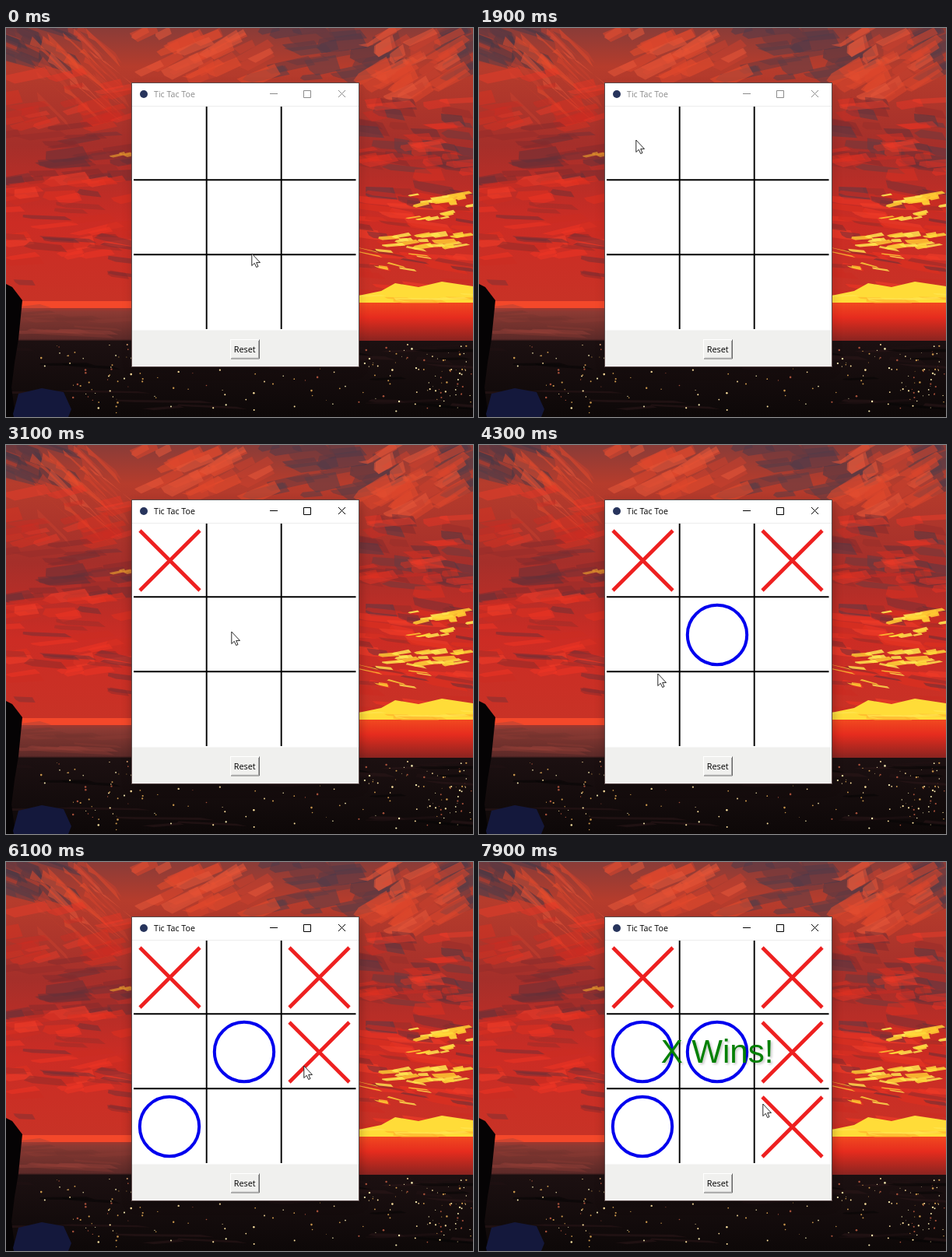
Recreate the animation shown at these times as an HTML page. Size 600 by 500 pixels, loop 8 s.

```html
<!DOCTYPE html>
<html lang="en">
<head>
<meta charset="utf-8">
<title>Tic Tac Toe</title>
<style>
  html, body { margin: 0; width: 100%; height: 100%; overflow: hidden; background: #140c0d; }
  svg { display: block; width: 100%; height: 100%; }
  .ui { font-family: "Open Sans", "Noto Sans", sans-serif; }
  .win { font: 42px "Liberation Sans", Arial, sans-serif; filter: drop-shadow(2px 2px 1.5px rgba(0, 0, 0, .22)); }
</style>
</head>
<body>
<svg viewBox="0 0 600 500">
  <defs>
    <linearGradient id="sky" x2="0" y2="1">
      <stop offset="0" stop-color="#8a3c38"/>
      <stop offset=".1" stop-color="#b63c2c"/>
      <stop offset=".3" stop-color="#a52f2a"/>
      <stop offset=".5" stop-color="#cc2c24"/>
      <stop offset=".7" stop-color="#c83226"/>
      <stop offset=".73" stop-color="#8c3a33"/>
      <stop offset=".8" stop-color="#5c2a28"/>
      <stop offset=".805" stop-color="#1c1011"/>
      <stop offset="1" stop-color="#0d0808"/>
    </linearGradient>
    <linearGradient id="glow" x2="0" y2="1">
      <stop offset="0" stop-color="#f24a20"/>
      <stop offset=".4" stop-color="#e62c1e"/>
      <stop offset="1" stop-color="#8a2420"/>
    </linearGradient>
    <filter id="blur" x="-20%" y="-20%" width="140%" height="140%"><feGaussianBlur stdDeviation="7"/></filter>
  </defs>

  <rect width="600" height="500" fill="url(#sky)"/>
  <g id="paint"></g>
  <path d="M0 329 8 333 21 350 16 400 11 430 7 462 12 500H0Z" fill="#050304"/>
  <path d="M9 496 16 470 46 463 74 468 84 490 80 500H10Z" fill="#14183c"/>

  <rect id="shadow" x="162" y="76" width="292" height="364" filter="url(#blur)"/>
  <rect x="161.5" y="70.5" width="292" height="365" fill="#fff" stroke="#5b4a4a"/>
  <path d="M162 100.5H453" stroke="#ececec"/>
  <rect x="162" y="388.5" width="291" height="46" fill="#f0f0ee"/>
  <circle cx="177" cy="85" r="5" fill="#27345c"/>
  <g id="title">
    <text class="ui" x="190" y="89" font-size="10.7">Tic Tac Toe</text>
    <path d="M339 84.5H349M382.5 80.5H391.5V89.5H382.5ZM427 80 436 89M436 80 427 89" fill="none" stroke="currentColor"/>
  </g>
  <path d="M257.7 101V387M353.7 101V387M164 195.2H449.5M164 291.2H449.5" stroke="#000" stroke-width="1.9"/>
  <g id="marks" fill="none"></g>

  <rect x="288" y="400" width="38" height="25.5" fill="#fff"/>
  <path d="M289 425H325.5V400.5" fill="none" stroke="#666"/>
  <path d="M290 424H324.5V402" fill="none" stroke="#a5a5a5"/>
  <rect x="289" y="401" width="35" height="22.5" fill="#f0f0ee"/>
  <text class="ui" x="306.7" y="416.6" font-size="10.9" text-anchor="middle">Reset</text>

  <text id="win" class="win" x="306" y="258" text-anchor="middle" fill="#008000">X Wins!</text>
  <path id="cursor" d="M-.2 0V15.5L3.3 12.3 5.7 17.5 8 16.5 5.7 11.4H10.5Z" fill="#fff" stroke="#111" stroke-width=".9"/>
</svg>
<script>
const LOOP = 8000, STEP = 100;
const $ = id => document.getElementById(id);

let seed = 11;
const rnd = () => (seed = (seed * 16807) % 2147483647) / 2147483647;
const span = (a, b) => a + (b - a) * rnd();
const pick = list => list[Math.floor(rnd() * list.length)];

// Fills a box with ragged four-cornered brush dabs.
function brush(n, [x0, y0, x1, y1], colors, len, thick, slope = 0, alpha = .55) {
  let out = "";
  for (let i = 0; i < n; i++) {
    const l = len * span(.4, 1.2), h = thick * span(.5, 1.2), d = l * (slope + span(-.08, .08));
    const x = span(x0, x1) - l / 2, y = span(y0, y1) - (d + h) / 2;
    const dab = [l * span(.7, 1), d, l * .15, h * span(.5, 1), -l * span(.7, .9), -d * .9, -l * .2, -h * .3];
    out += `<path d="M${x.toFixed(1)} ${y.toFixed(1)}l${dab.map(v => v.toFixed(1)).join(" ")}z" fill="${pick(colors)}" opacity="${alpha}"/>`;
  }
  return out;
}

function lights(n, [x0, y0, x1, y1]) {
  let out = "";
  for (let i = 0; i < n; i++) {
    out += `<circle cx="${span(x0, x1).toFixed(1)}" cy="${span(y0, y1).toFixed(1)}" r="${span(.4, 1.3).toFixed(2)}" fill="${pick(["#ffe2a0", "#f4e8b0", "#c9964c", "#a5503a"])}"/>`;
  }
  return out;
}

const slate = ["#4a3844", "#5b3c45", "#503a48", "#6a3a3e"];
const ember = ["#dc452c", "#e84c2c", "#c8402e", "#e5573a"];
const red = ["#e0301f", "#ee3424", "#cc2c22", "#f23c28"];
const wine = ["#842b2c", "#743036", "#962d2a", "#643038"];
const gold = ["#ffd83a", "#ffc832", "#ffe650"];

$("paint").innerHTML = [
  brush(22, [0, 0, 70, 45], slate, 55, 18, .3),
  brush(24, [330, 0, 490, 70], slate, 55, 20, -.15),
  brush(12, [570, 0, 600, 60], slate, 45, 18, -.4),
  brush(32, [60, 10, 145, 115], ember, 55, 14, .8, .5),
  brush(34, [170, 0, 330, 65], ember, 50, 16, -.4),
  brush(36, [465, 5, 580, 90], ember, 50, 17, -.5),
  brush(24, [0, 60, 160, 130], red, 50, 16, -.2, .4),
  brush(28, [0, 125, 162, 205], wine, 60, 14, -.1, .5),
  brush(32, [0, 195, 162, 300], red, 60, 13, -.12),
  brush(16, [0, 205, 162, 345], wine, 55, 10, .1, .45),
  brush(30, [453, 95, 600, 215], [...wine, ...slate], 55, 18, .1, .5),
  brush(22, [453, 95, 600, 205], red, 50, 14, -.1, .45),
  brush(38, [453, 215, 600, 350], red, 65, 12, .1, .6),
  brush(14, [455, 210, 600, 315], wine, 55, 9, .1),
  brush(16, [520, 214, 600, 230], gold, 26, 6, -.15, .9),
  brush(7, [515, 236, 580, 246], gold, 22, 4, -.15, .85),
  brush(18, [485, 265, 595, 282], gold, 28, 6, -.1, .85),
  brush(10, [455, 284, 540, 312], gold, 25, 4, .15, .8),
  brush(4, [137, 158, 158, 167], ["#d98a2c"], 16, 4, -.15, .8),
  '<path d="M0 351H162V360H0Z" fill="#f4482a"/><path d="M453 352H600V402H453Z" fill="url(#glow)"/>',
  '<path d="M453 344 482 338 500 328 530 333 560 326 600 332V353H453Z" fill="#ffdc38"/>',
  brush(10, [455, 340, 600, 352], ["#ffb52c", "#ffe650"], 50, 5, 0, .7),
  brush(14, [0, 362, 162, 396], ["#9c423a", "#70342f", "#8b3a33"], 90, 6, 0, .4),
  brush(26, [0, 410, 600, 495], ["#2a1718", "#080506", "#201213"], 110, 6, 0, .6),
  lights(22, [20, 406, 162, 440]),
  lights(26, [85, 440, 162, 495]),
  lights(34, [453, 406, 600, 440]),
  lights(38, [545, 425, 600, 490]),
  lights(16, [453, 440, 545, 495]),
  lights(36, [162, 438, 453, 495])
].join("");

// Moves: time, mark, column, row.
const moves = [
  [2200, "X", 0, 0], [3300, "O", 1, 1], [3900, "X", 2, 0], [4700, "O", 0, 2],
  [6100, "X", 2, 1], [6700, "O", 0, 1], [7400, "X", 2, 2]
];
$("marks").innerHTML = moves.map(([, mark, col, row]) => {
  const x = 210 + 96 * col, y = 148 + 96 * row;
  return mark === "X"
    ? `<path d="M${x - 38} ${y - 38}l77 77m0 -77l-77 77" stroke="#ee2020" stroke-width="4.7"/>`
    : `<circle cx="${x}" cy="${y}" r="38.2" stroke="#0000ee" stroke-width="4"/>`;
}).join("");
const marks = [...$("marks").children];

// Pointer stops: time, x, y.
const stops = [
  [0, 316, 290], [200, 316, 290], [1000, 361, 191], [1900, 202, 144], [2200, 201, 144],
  [2500, 288, 236], [2800, 288, 236], [3100, 290, 240], [3300, 293, 243], [3700, 398, 172],
  [3900, 392, 176], [4000, 392, 176], [4300, 230, 294], [4500, 196, 347], [4700, 196, 347],
  [5300, 308, 167], [5700, 308, 167], [5900, 383, 262], [6100, 383, 262], [6500, 240, 246],
  [6600, 240, 246], [6700, 263, 250], [6800, 263, 250], [7300, 365, 311], [LOOP, 365, 311]
];
function pointer(t) {
  const i = stops.findIndex(s => s[0] > t);
  const [t0, x0, y0] = stops[i - 1], [t1, x1, y1] = stops[i];
  const k = (t - t0) / (t1 - t0);
  return [x0 + (x1 - x0) * k, y0 + (y1 - y0) * k].map(Math.round);
}

function draw(now) {
  const t = Math.floor((now % LOOP) / STEP) * STEP;
  const active = t >= 2200, ink = active ? "#000" : "#8b8b8b";
  $("title").setAttribute("fill", ink);
  $("title").setAttribute("color", ink);
  $("shadow").setAttribute("opacity", active ? .3 : .15);
  marks.forEach((m, i) => m.setAttribute("visibility", t >= moves[i][0] ? "visible" : "hidden"));
  $("win").setAttribute("visibility", t >= 7800 ? "visible" : "hidden");
  $("cursor").setAttribute("transform", `translate(${pointer(t)})`);
}

const start = performance.now();
function tick() {
  draw(performance.now() - start);
  requestAnimationFrame(tick);
}
tick();
</script>
</body>
</html>
```
